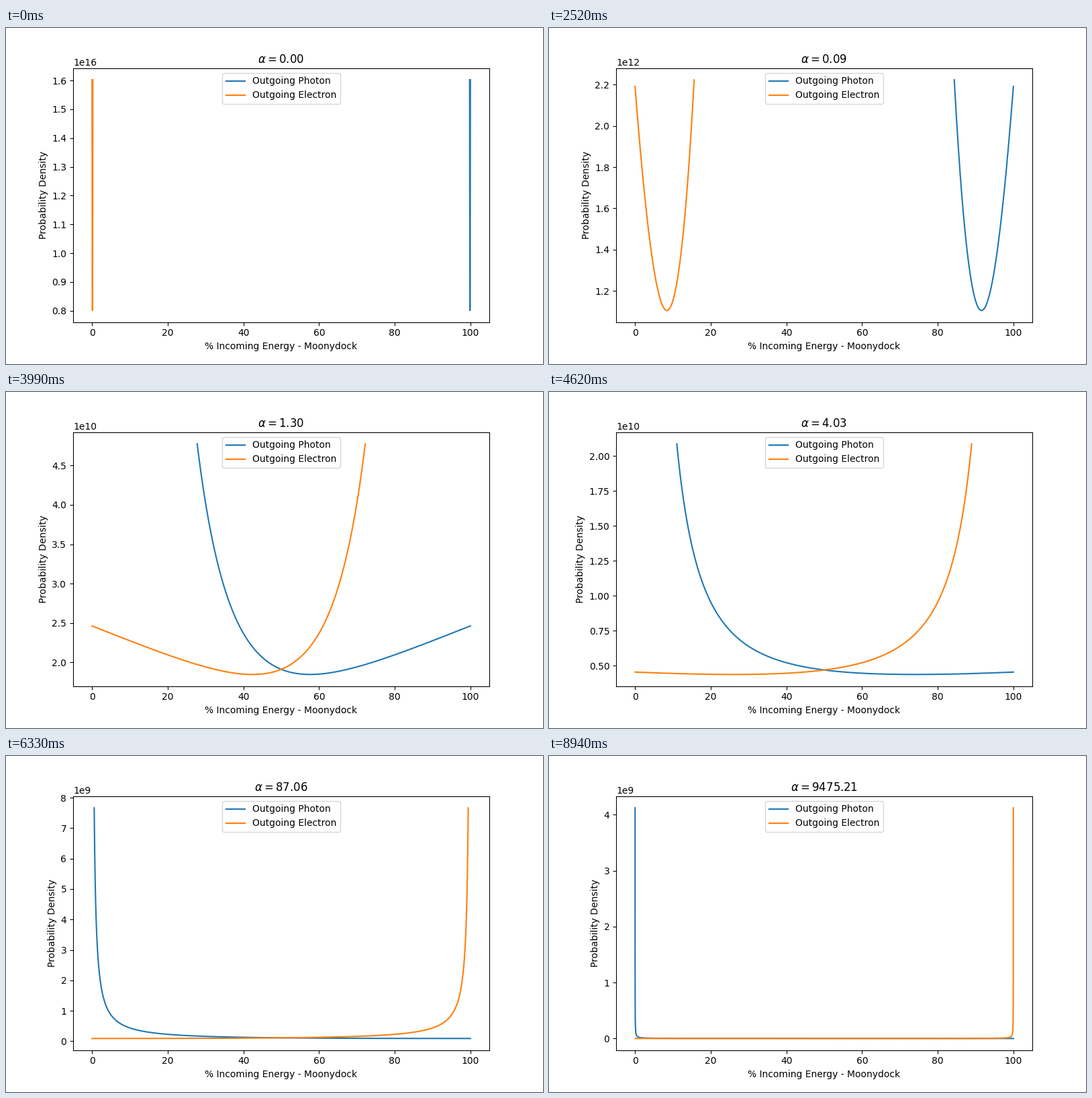
These frames come from a looping animation (800x500 px, 8.97 s). A matplotlib script:

```python
import numpy as np
import matplotlib.pyplot as plt
from matplotlib.animation import FuncAnimation

FRAMES = 299
STEPS = 1800
REST_ENERGY = 8.1871e-14  # electron, in joules

alphas = np.logspace(-3, 4, FRAMES + 1)
theta = np.linspace(0, np.pi, STEPS + 1)
cos = np.cos(theta)


def spectrum(a):
    """Klein-Nishina photon energy share and its density for energy a."""
    p = 1 / (1 + a * (1 - cos))
    shape = p + 1 / p - np.sin(theta) ** 2
    weight = p**2 * shape * np.sin(theta)
    total = a * weight.sum()  # sum over angle steps
    return 100 * p, shape / (a * total * REST_ENERGY)


plt.rcParams["font.family"] = "DejaVu Sans"
fig, ax = plt.subplots(figsize=(8, 5), dpi=100)
fig.subplots_adjust(left=0.125, right=0.9, bottom=0.125, top=0.88)
photon, = ax.plot([], [], label="Outgoing Photon")
electron, = ax.plot([], [], label="Outgoing Electron")
ax.set_xlabel("% Incoming Energy - Moonydock")
ax.set_ylabel("Probability Density")
ax.legend(loc="upper center")


def update(i):
    share, density = spectrum(alphas[i])
    photon.set_data(share, density)
    electron.set_data(100 - share, density)
    ax.relim()
    ax.autoscale_view()
    ax.set_title(rf"$\alpha = {alphas[i]:.2f}$")
    return photon, electron


anim = FuncAnimation(fig, update, frames=FRAMES, interval=30, repeat=True)
plt.show()
```
